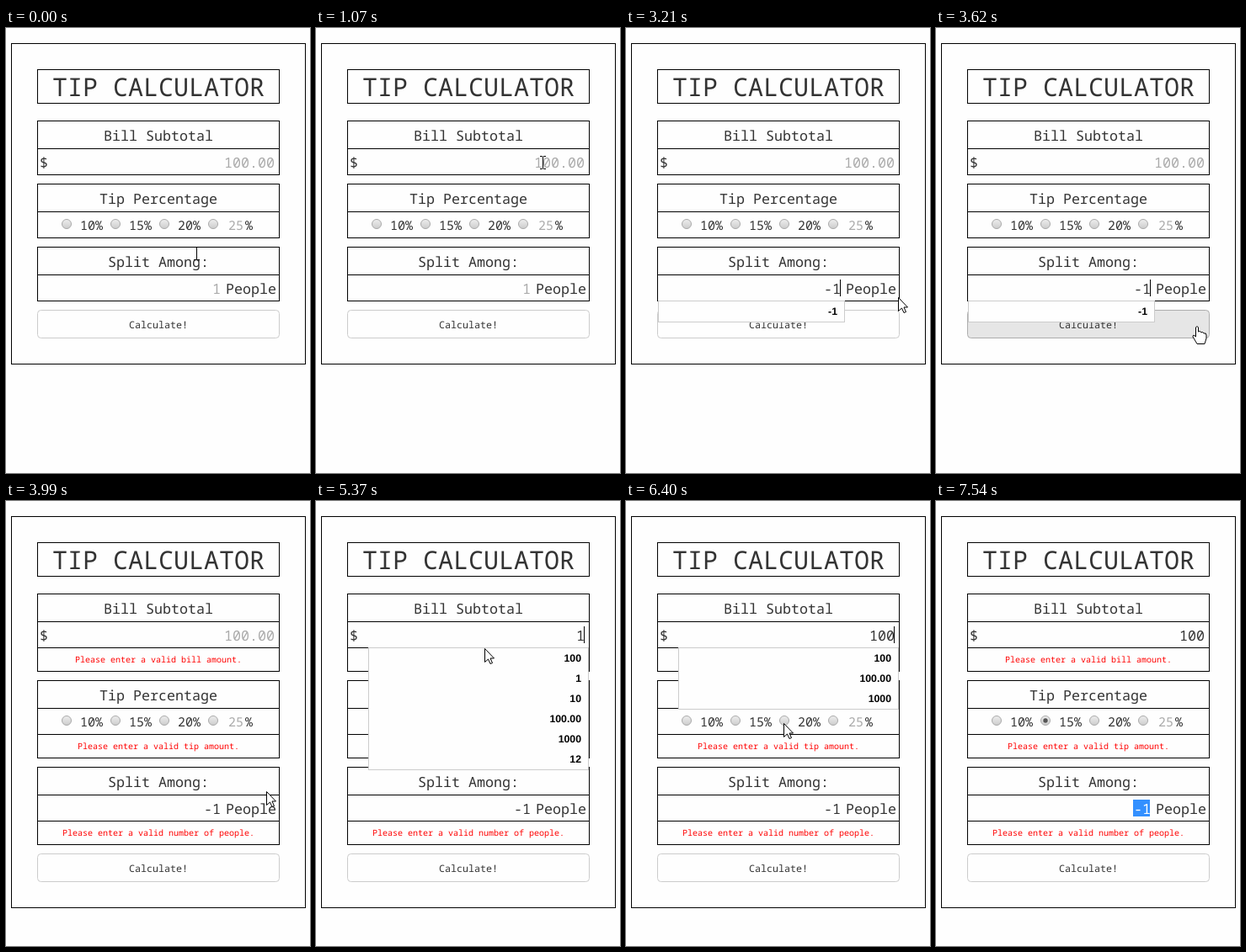
Animation of 361 by 529 pixels, one loop 8 s. Source, as an HTML page:

```html
<!DOCTYPE html>
<html lang="en">
<head>
<meta charset="utf-8">
<title>Tip calculator</title>
<style>
  html, body { margin: 0; width: 100%; height: 100%; overflow: hidden; background: #fefefe; }
  svg { display: block; width: 100vw; height: 100vh; }
  text { font-family: "Noto Sans Mono", "DejaVu Sans Mono", monospace; text-rendering: geometricPrecision; white-space: pre; }
  .option { font: bold 12.3px "Liberation Sans", Arial, sans-serif; }
</style>
</head>
<body>
<svg id="stage" viewBox="0 0 361 529">
  <defs>
    <linearGradient id="knob" x2="0" y2="1">
      <stop stop-color="#eee"/><stop offset="1" stop-color="#ccc"/>
    </linearGradient>
  </defs>
  <g id="scene"></g>
</svg>
<script>
const LOOP = 8000;
const INK = '#333', PALE = '#aaa';
const SHOW_ERRORS = 3740, CLOSE_BILL = 6750, PICK_TIP = 6850, SELECT = 7540;

// Pointer path: time, x, y, shape
const path = [
  [0, 226, 268, 'beam'], [70, 226, 268, 'beam'], [150, 190, 290, 'arrow'], [300, 125, 241, 'beam'],
  [510, 125, 241, 'beam'], [700, 170, 205, 'beam'], [900, 281, 155, 'beam'], [1070, 269, 160, 'beam'],
  [1290, 269, 160, 'beam'], [1400, 265, 230, 'arrow'], [1480, 262, 345, 'hand'], [1520, 260, 363, 'hand'],
  [1770, 260, 363, 'hand'], [1850, 264, 335, 'arrow'], [1930, 268, 308, 'beam'],
  [3209, 268, 308, 'beam'], [3210, 323, 320, 'arrow'], [3255, 323, 320, 'arrow'],
  [3380, 349, 335, 'arrow'], [3560, 315, 356, 'hand'], [3640, 309, 354, 'hand'],
  [3989, 309, 354, 'hand'], [3990, 309, 345, 'arrow'], [4040, 309, 345, 'arrow'],
  [4250, 225, 134, 'arrow'], [4360, 196, 160, 'beam'], [4730, 196, 160, 'beam'],
  [4850, 200, 175, 'arrow'], [5900, 200, 175, 'arrow'], [6400, 187, 264, 'arrow'], [6450, 187, 264, 'arrow'],
  [6560, 165, 273, 'arrow'], [6690, 130, 262, 'arrow'], [6900, 130, 262, 'arrow'],
  [7250, 235, 340, 'arrow'], [7350, 248, 372, 'beam'], [7480, 244, 366, 'beam'], [SELECT, 244, 366, 'none']
];

// Typed values with their suggestions: time, value, options
const bill = [
  [0, '', []],
  [5370, '1', ['100', '1', '10', '100.00', '1000', '12']],
  [5490, '10', ['100', '10', '100.00', '1000']],
  [5610, '100', ['100', '100.00', '1000']],
  [CLOSE_BILL, '100', []]
];
const people = [
  [0, '', []], [2520, '-', ['-1', '-5']], [2700, '-1', ['-1']], [3690, '-1', []]
];

const shapes = {
  arrow: '<path d="M.5.5V16.5L4.5 13 7 18.5 9.5 17.5 7 12H11.5Z" fill="#fff" stroke="#000"/>',
  beam: '<path d="M-3-7.5H0M1-7.5H4M.5-7V7M-3 7.5H0M1 7.5H4" fill="none" stroke="#000"/>',
  hand: '<path d="M-1.5 13V2Q0-1 1.5 2V7Q4 5.500 5 8Q7 6.500 8 9Q11 8 11 11V15L9 21.5H0L-5 13Q-5 9.500-1.500 13Z" fill="#fff" stroke="#000"/>',
  none: ''
};

const current = (list, t) => list.findLast(entry => entry[0] <= t);
const within = (t, from, to) => t >= from && t < to;

function pointerAt(t) {
  const i = path.findLastIndex(key => key[0] <= t);
  const [t0, x0, y0, shape] = path[i];
  const [t1, x1, y1] = path[i + 1] || [LOOP, x0, y0];
  const p = (t - t0) / (t1 - t0);
  return { x: Math.round(x0 + (x1 - x0) * p), y: Math.round(y0 + (y1 - y0) * p), shape };
}

const box = (x, y, w, h, stroke = '#000', fill = 'none', r = 0) =>
  `<rect x="${x}" y="${y}" width="${w}" height="${h}" rx="${r}" fill="${fill}" stroke="${stroke}"/>`;
const rule = y => `<path d="M37.5 ${y}H324.5" stroke="#000"/>`;
const caret = (x, y) => `<path d="M${x} ${y}v20" stroke="#000"/>`;
const text = (s, x, y, size = 16.667, fill = INK, anchor = 'start') =>
  `<text x="${x}" y="${y}" font-size="${size}" fill="${fill}" text-anchor="${anchor}">${s}</text>`;

function section(top, extra, title, error) {
  let out = box(37.5, top, 287, 64 + extra) + rule(top + 33) + text(title, 181, top + 23.5, 16.667, INK, 'middle');
  if (extra) out += rule(top + 64) + text(error, 181, top + 81.5, 10, 'red', 'middle');
  return out;
}

function radio(x, y, checked) {
  return `<circle cx="${x}" cy="${y}" r="5.5" fill="url(#knob)" stroke="#aaa"/>` +
    (checked ? `<circle cx="${x}" cy="${y}" r="2.7" fill="#555"/>` : '');
}

function dropdown(x, y, w, options, active) {
  if (!options.length) return '';
  return box(x + .5, y + .5, w - 1, options.length * 24 + 1, '#ccc', '#fefefe') + options.map((s, i) =>
    (i === active ? `<rect x="${x + 1}" y="${y + 1 + i * 24}" width="${w - 2}" height="24" fill="#cdcdcd"/>` : '') +
    `<text class="option" x="${x + w - 9}" y="${y + 17 + i * 24}" text-anchor="end">${s}</text>`).join('');
}

function draw(t) {
  const extra = t >= SHOW_ERRORS ? 28 : 0;
  const tops = [0, 1, 2].map(i => 110.5 + i * (75 + extra));
  const pointer = pointerAt(t);
  const [, billValue, billOptions] = current(bill, t);
  const [, peopleValue, peopleOptions] = current(people, t);
  const active = pointer.y > 176 ? Math.floor((pointer.y - 175) / 24) : -1;
  const preview = billOptions[active];
  const hover = pointer.shape === 'hand' && !extra;
  const buttonTop = 335.5 + extra * 3;
  const tipY = tops[1] + 47.5, peopleY = tops[2] + 55.5;
  const selected = t >= SELECT;

  let out = box(6.5, 18.5, 349, 381 + extra * 3) + box(37.5, 49.5, 287, 40) +
    text('TIP CALCULATOR', 181, 81, 30, INK, 'middle');
  if (preview) out += '<rect x="62" y="144" width="262" height="30" fill="#faffbd"/>';

  out += section(tops[0], extra, 'Bill Subtotal', 'Please enter a valid bill amount.') +
    section(tops[1], extra, 'Tip Percentage', 'Please enter a valid tip amount.') +
    section(tops[2], extra, 'Split Among:', 'Please enter a valid number of people.');

  const billText = preview || billValue;
  out += text('$', 40, 166) + text(billText || '100.00', 319, 166, 16.667, billText ? INK : PALE, 'end');
  if (within(t, 4730, 5220) || within(t, 5370, CLOSE_BILL)) out += caret(318.5, 149);

  ['10%', '15%', '20%', '<tspan fill="#aaa">25</tspan>'].forEach((label, i) => {
    out += radio(72 + i * 58, tipY, i === 1 && t >= PICK_TIP) +
      text(label, i < 3 ? 88 + i * 58 : 264, tipY + 7, 15);
  });
  out += text('%', 284, tipY + 7, 15);

  if (selected) out += `<rect x="234" y="${peopleY - 17}" width="20" height="20" fill="#3390ff"/>`;
  out += text(peopleValue || '1', 255, peopleY, 16.667, selected ? '#fff' : peopleValue ? INK : PALE, 'end') +
    text('People', 261, peopleY);
  if (within(t, 1970, 2470) || within(t, 2520, 3690)) out += caret(254.5, 299);

  out += box(37.5, buttonTop, 287, 33, hover ? '#adadad' : '#ccc', hover ? '#e6e6e6' : '#fefefe', 4) +
    text('Calculate!', 181, buttonTop + 21, 11.667, INK, 'middle');

  out += dropdown(62, 174, 262, billOptions, active) + dropdown(38, 324, 222, peopleOptions, -1);
  out += `<g transform="translate(${pointer.x} ${pointer.y})">${shapes[pointer.shape]}</g>`;
  return out;
}

const scene = document.getElementById('scene');
const start = performance.now();
function tick() {
  scene.innerHTML = draw((performance.now() - start) % LOOP);
  requestAnimationFrame(tick);
}
tick();
</script>
</body>
</html>
```
